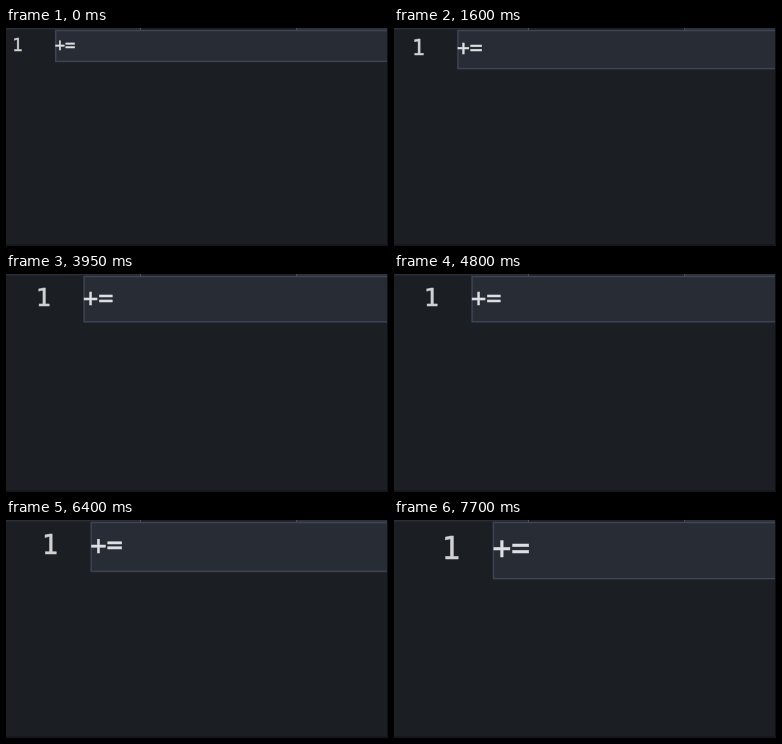
Recreate the animation shown at these times as an HTML page. Size 382 by 218 pixels, loop 8000 ms.

```html
<!DOCTYPE html>
<html lang="en">
<head>
<meta charset="utf-8">
<title>Editor zoom</title>
<style>
  html, body { margin: 0; width: 100%; height: 100%; overflow: hidden; background: #1b1e22; }
  svg { display: block; width: 382px; height: 218px; }
  text { font-family: "DejaVu Sans Mono", monospace; white-space: pre; stroke-width: 0.45; }
</style>
</head>
<body>
<svg viewBox="0 0 382 218">
  <rect width="382" height="218" fill="#1b1e22"/>
  <rect width="134" height="1.5" fill="#2a2e37"/>
  <rect x="291" width="91" height="2" fill="#2c313b"/>
  <rect x="134" width="1" height="2" fill="#4a4f59"/>
  <rect x="290" width="1" height="2" fill="#4a4f59"/>
  <rect id="line" y="2.5" fill="#282c34" stroke="#3d4454" stroke-width="1.5"/>
  <rect x="381" width="1" height="218" fill="#0e1013"/>
  <rect y="216" width="382" height="2" fill="#17171b"/>
  <text id="number" fill="#cfd1d3" stroke="#cfd1d3">1</text>
  <text id="code" fill="#dcdfe4" stroke="#dcdfe4">+=</text>
</svg>
<script>
  const LOOP = 8000;
  const zoomTimes = [0, 350, 1400, 2700, 3950, 5200, 6450, 7700];
  const [line, number, code] = ["line", "number", "code"].map(id => document.getElementById(id));

  function set(el, attrs) {
    for (const key in attrs) el.setAttribute(key, attrs[key]);
  }

  // Every zoom step grows the font by 2px and the layout in proportion.
  function drawZoom(step) {
    const size = 17.2 + 2 * step;
    const left = 49.7 + 7.1 * step;
    const baseline = 22.5 + 2.37 * step;
    const bottom = 33.4 + 3.6 * step;
    set(line, { x: left, width: 390 - left, height: bottom - 2.5 });
    set(number, { x: 6.2 + 5.9 * step, y: baseline, "font-size": size });
    set(code, { x: left - 1, y: baseline, "font-size": size });
  }

  let shown = -1;
  function frame() {
    const time = performance.now() % LOOP;
    const step = zoomTimes.filter(t => t <= time).length - 1;
    if (step !== shown) drawZoom(shown = step);
    requestAnimationFrame(frame);
  }
  frame();
</script>
</body>
</html>
```
